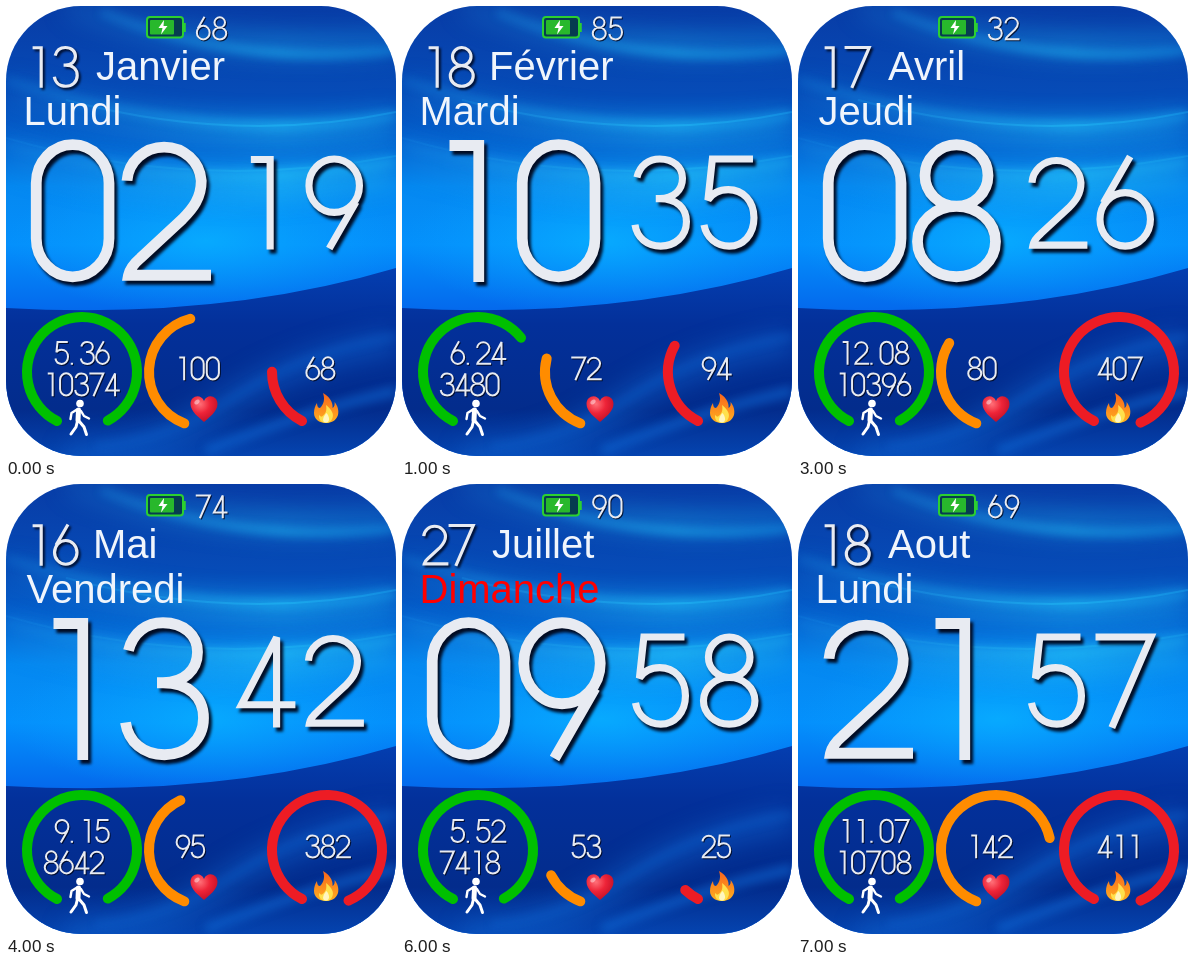
An HTML page that plays this animation: 390 px wide and 450 px high, repeating every 8 s.

```html
<!DOCTYPE html>
<html lang="fr">
<head>
<meta charset="utf-8">
<title>Cadran</title>
<style>
html, body { margin: 0; width: 100%; height: 100%; overflow: hidden; background: #fff; }
svg { display: block; width: 390px; height: 450px; }
.face { visibility: hidden; animation: show 8s step-end infinite; }
@keyframes show {
  0% { visibility: visible; }
  12.5%, 100% { visibility: hidden; }
}
.word { font: 40px "Liberation Sans", Arial, sans-serif; fill: #f0f5fc; }
.weekend { fill: #f00; }
.digits { fill: none; stroke: #e8ebf2; stroke-width: 7.2; stroke-miterlimit: 3.5; }
.big { filter: drop-shadow(3.5px 4px 1.5px rgba(0, 5, 25, .95)); }
.mid { filter: drop-shadow(2px 2px 1px rgba(0, 5, 25, .9)); }
.small { stroke-width: 8; filter: drop-shadow(1px 1px .5px rgba(0, 5, 25, .8)); }
.ring { fill: none; stroke-width: 10; stroke-linecap: round; }
.soft { filter: blur(5px); }
.haze { filter: blur(12px); }
</style>
</head>
<body>
<svg viewBox="0 0 390 450">
  <defs>
    <clipPath id="screen"><rect width="390" height="450" rx="75"/></clipPath>
    <linearGradient id="sky" x2="0" y2="1">
      <stop offset="0" stop-color="#083ca6"/>
      <stop offset=".2" stop-color="#064cb8"/>
      <stop offset=".32" stop-color="#0568d4"/>
      <stop offset=".4" stop-color="#0588f0"/>
      <stop offset=".53" stop-color="#0490fc"/>
      <stop offset=".68" stop-color="#0468ec"/>
    </linearGradient>
    <linearGradient id="deep" x2="0" y2="1">
      <stop offset="0" stop-color="#043eb0"/>
      <stop offset=".3" stop-color="#03309a"/>
      <stop offset=".75" stop-color="#032c8c"/>
      <stop offset="1" stop-color="#0544b0"/>
    </linearGradient>
    <linearGradient id="glow" gradientUnits="userSpaceOnUse" x2="390">
      <stop offset="0" stop-color="#1890e8" stop-opacity=".3"/>
      <stop offset=".35" stop-color="#20a4ec" stop-opacity=".6"/>
      <stop offset=".7" stop-color="#20b8f4" stop-opacity=".95"/>
      <stop offset="1" stop-color="#18a0ec" stop-opacity=".8"/>
    </linearGradient>
    <radialGradient id="shine">
      <stop offset="0" stop-color="#08b0ff" stop-opacity=".8"/>
      <stop offset="1" stop-color="#08a0ff" stop-opacity="0"/>
    </radialGradient>
    <radialGradient id="red" cx=".35" cy=".3" r=".8">
      <stop offset="0" stop-color="#ff7078"/>
      <stop offset=".45" stop-color="#ee2438"/>
      <stop offset="1" stop-color="#b80c24"/>
    </radialGradient>
    <linearGradient id="flame" x2="0" y2="1">
      <stop offset="0" stop-color="#f8641c"/>
      <stop offset="1" stop-color="#ffb020"/>
    </linearGradient>
  </defs>

  <g clip-path="url(#screen)">
    <rect width="390" height="450" fill="url(#sky)"/>
    <ellipse cx="200" cy="235" rx="200" ry="75" fill="url(#shine)"/>
    <g fill="none" stroke="url(#glow)">
      <path class="haze" d="M60 0Q200 52 390 36" stroke-width="20" opacity=".5"/>
      <path class="soft" d="M95 6Q230 62 390 44" stroke-width="7" opacity=".7"/>
      <path class="haze" d="M0 82Q200 146 390 118" stroke-width="24" opacity=".6"/>
      <path class="soft" d="M0 74Q210 142 390 109" stroke-width="8" opacity=".8"/>
      <path d="M60 94Q230 139 390 106" stroke-width="2" opacity=".6"/>
      <path class="haze" d="M0 148Q190 200 390 166" stroke-width="30" opacity=".7"/>
      <path class="soft" d="M0 138Q190 192 390 155" stroke-width="10" opacity=".8"/>
      <path d="M0 132Q190 187 390 150" stroke-width="2" opacity=".5"/>
    </g>
    <path d="M0 302Q215 314 390 262V450H0Z" fill="url(#deep)"/>
    <g fill="none" stroke="#1068d4">
      <path class="haze" d="M390 335Q290 350 215 400T60 450" stroke-width="24" opacity=".5"/>
      <path class="soft" d="M390 330Q300 345 230 390T90 440" stroke-width="5" opacity=".5"/>
      <path class="soft" d="M390 385Q300 405 200 445" stroke-width="10" opacity=".6"/>
    </g>

    <g id="faces"></g>

    <g id="battery">
      <rect x="141" y="11" width="36" height="20.500" rx="3" fill="#063c50" stroke="#2cd030" stroke-width="2"/>
      <path d="M178.500 17V26" stroke="#2cd030" stroke-width="2.500"/>
      <rect x="144" y="14" width="24" height="14.500" rx="1" fill="#28b82c"/>
      <path d="M158 14L152.500 22H156.500L155 28.500L161.500 20H157.500Z" fill="#fff"/>
    </g>
    <g id="walker" fill="none" stroke="#fff" stroke-width="3" stroke-linecap="round" stroke-linejoin="round">
      <circle cx="74" cy="397.500" r="3.800" fill="#fff" stroke="none"/>
      <path d="M72.500 404L72 414" stroke-width="5"/>
      <path d="M71 403.500L65.500 407L64.500 413M75 405L78 410L83 412.500" stroke-width="2.400"/>
      <path d="M71.500 415L70 421L65 428M73 415L78 421L80.500 428.500"/>
    </g>
    <g id="heart" transform="translate(198 402.500)">
      <path d="M0 13.500C-5 9-13.500 3-13.500-4.500C-13.500-13-3-15 0-7.500C3-15 13.500-13 13.500-4.500C13.500 3 5 9 0 13.500Z" fill="url(#red)"/>
      <ellipse cx="-7" cy="-6.500" rx="3" ry="2" fill="#fff" opacity=".45" transform="rotate(-35 -7 -6.500)"/>
    </g>
    <g id="fire">
      <path d="M317 387C326 392 327 399 326.500 402C328.500 401 329 398 328.500 396C332 400 333 405 332 409C330 415 325 417 320 417C313 417 308 413 308 407C308 403 309 400 311 397C311 400 312 402 314 402C318 398 319 393 317 387Z" fill="url(#flame)"/>
      <path d="M320 399C326 404 328 408 326.500 412C325 416 322.500 417 320 417C315 417 312.500 413 313 409C314 410 315 411 316 410.500C320 408 321 404 320 399Z" fill="#ffe04c"/>
      <path d="M320.500 407C324 411 324 416.500 320 416.500C316 416.500 316 412 320.500 407Z" fill="#fff6c0"/>
    </g>
  </g>
</svg>

<script>
// Centre lines of the numerals in a 60 x 95 box
const six = "M34 1L7 48M3.500 64.500A25.500 27 0 1 1 54.500 64.500A25.500 27 0 1 1 3.500 64.500Z";
const glyphs = {
  0: "M3.500 29A24.200 25.500 0 0 1 52 29V66A24.200 25.500 0 0 1 3.500 66Z",
  1: "M15 4H34.500V95",
  2: "M4 27.500A24.800 24 0 0 1 53.500 27.500C53.500 39 48 46 41 53L13 79Q6 85 5 90.500H60",
  3: "M5 22C8 10 17 3.500 28 3.500C42 3.500 51 12 51 23C51 35 42 43.500 28 43.500H24H28C45 43.500 55 53 55 67C55 82 43 91.500 29 91.500C15 91.500 5 83 3 70",
  4: "M60 72H5.500L41 4V95",
  5: "M53 3.500H12L7.500 45C12 38 20 34.500 28 34.500C43 34.500 54 46 54 63C54 80 43 91.500 29 91.500C16 91.500 6 83 3.500 70",
  6: six,
  7: "M-1 3.500H55L15.500 95",
  8: "M8 24A21 20.500 0 1 1 50 24A21 20.500 0 1 1 8 24ZM3 68A26 23.500 0 1 1 55 68A26 23.500 0 1 1 3 68Z",
  9: six,
  ".": "M4 91H13"
};

// Side bearing of each initial, so that words align on their ink
const bearing = { M: 3, L: 3, D: 3, F: 3, S: 2, J: 0, A: 0, V: 0 };

const advance = (ch, step) => ch === "." ? step * .68 : step;
const width = (text, step) => [...text].reduce((w, ch) => w + advance(ch, step), 0);

function digits(text, x, y, scale, step, look) {
  let out = "";
  for (const ch of text) {
    const turn = ch === "9" ? " rotate(180 29.500 47.500)" : "";
    out += `<path d="${glyphs[ch]}" transform="translate(${x} ${y}) scale(${scale})${turn}"/>`;
    x += advance(ch, step);
  }
  return `<g class="digits ${look}" role="img" aria-label="${text}">${out}</g>`;
}

const small = (text, x, y, step = 15.2) => digits(text, x, y, .25, step, "small");

const word = (text, x, y, look = "") =>
  `<text class="word ${look}" x="${x - bearing[text[0]]}" y="${y}">${text}</text>`;

function ring(cx, color, start, sweep, full) {
  const point = deg => {
    const a = deg * Math.PI / 180;
    return `${cx + 55 * Math.sin(a)} ${366 - 55 * Math.cos(a)}`;
  };
  sweep = Math.max(1, Math.min(full, sweep));
  return `<path class="ring" stroke="${color}" d="M${point(start)}A55 55 0 ${sweep > 180 ? 1 : 0} 1 ${point(start + sweep)}"/>`;
}

function face([battery, day, month, weekday, hour, minute, km, steps, pulse, kcal], i) {
  const weekend = weekday === "Samedi" || weekday === "Dimanche";
  return `<g class="face" style="animation-delay:${i - 8}s">` +
    small(battery, 190, 10.5, 16.5) +
    digits(day, 47 - width(day, 27) / 2, 40, .44, 27, "mid") +
    word(month, 90, 74) +
    word(weekday, 20.5, 119, weekend ? "weekend" : "") +
    digits(hour, 25, 133.5, 1.5, 90, "big") +
    digits(minute, 230, 149.5, .99, 68.5, "big") +
    ring(76, "#00c000", 207, (steps - 1262) * .0922, 305) +
    ring(198, "#ff8c00", 201, (pulse - 34) * 2.19, 310) +
    ring(321, "#ed1c24", 207, (kcal - 10) * 1.09, 310) +
    small(km, 76.5 - width(km, 15.2) / 2, 335) +
    small(steps, 38, 366.5) +
    small(pulse, 169.5, 350.5) +
    small(kcal, 299.5, 350.5) + "</g>";
}

const days = [
  ["68", "13", "Janvier", "Lundi", "02", "19", "5.36", "10374", "100", "68"],
  ["85", "18", "Février", "Mardi", "10", "35", "6.24", "3480", "72", "94"],
  ["62", "19", "Mars", "Mercredi", "21", "48", "7.03", "2205", "88", "448"],
  ["32", "17", "Avril", "Jeudi", "08", "26", "12.08", "10396", "80", "407"],
  ["74", "16", "Mai", "Vendredi", "13", "42", "9.15", "8642", "95", "382"],
  ["95", "7", "Juin", "Samedi", "16", "10", "7.00", "3322", "64", "106"],
  ["90", "27", "Juillet", "Dimanche", "09", "58", "5.52", "7418", "53", "25"],
  ["69", "18", "Aout", "Lundi", "21", "57", "11.07", "10708", "142", "411"]
];
document.getElementById("faces").innerHTML = days.map(face).join("");
</script>
</body>
</html>
```
